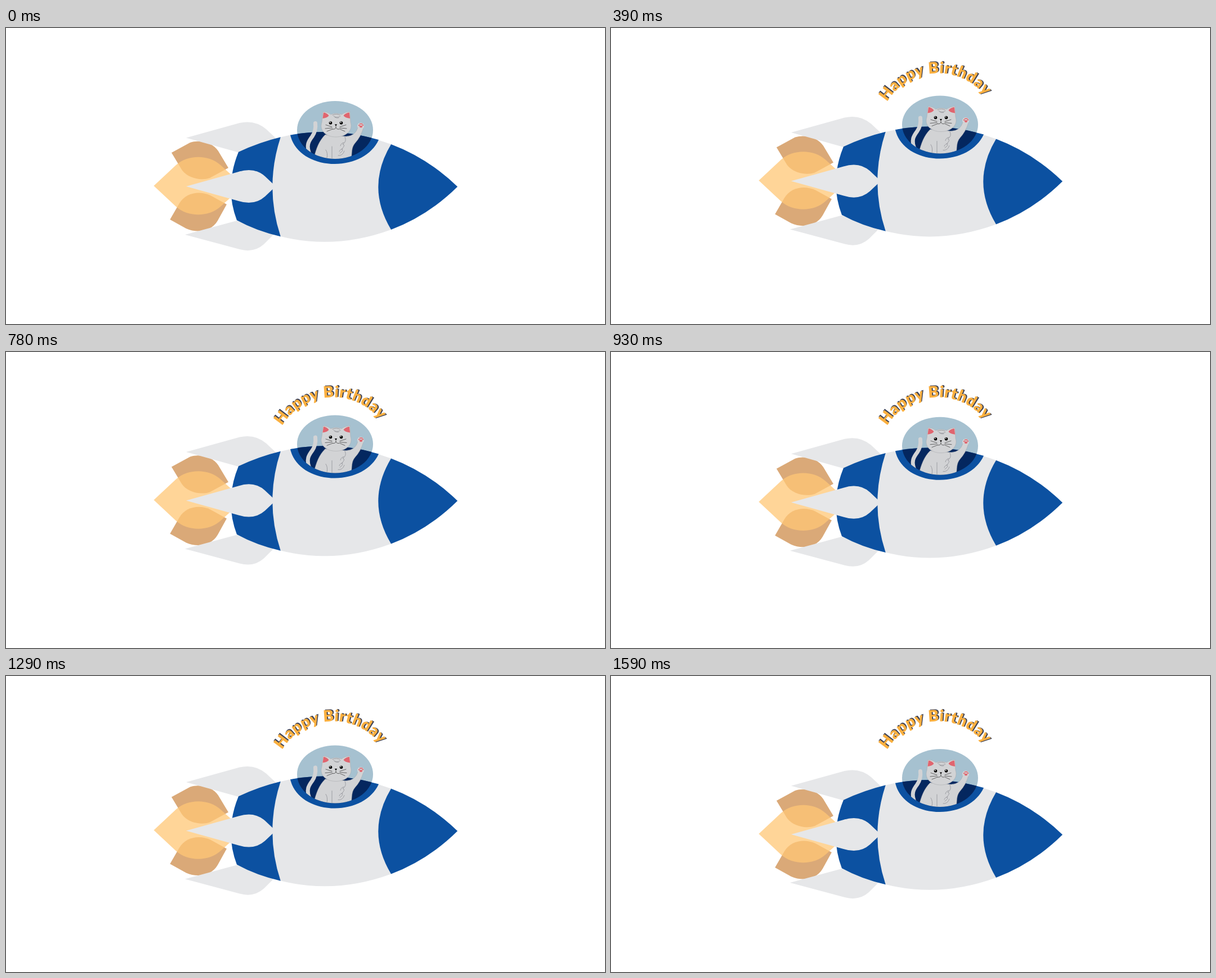
Recreate the animation shown at these times as an HTML page. Size 1064 by 527 pixels, loop 1.66 s.

```html
<!DOCTYPE html>
<html lang="en">
<head>
<meta charset="utf-8">
<title>Happy Birthday</title>
<style>
  html, body { margin: 0; height: 100%; overflow: hidden; background: #fff; }
  svg { display: block; width: 100vw; height: 100vh; }
  .blue { fill: #0c51a1; }
  .grey { fill: #e6e7e9; }
  .brown { fill: #daa978; }
  .fur { fill: #d2d3d5; }
  .edge { stroke: #a3a4a8; stroke-width: .5; }
  .pink { fill: #e0656f; }
  .line { fill: none; stroke: #333; stroke-width: .7; stroke-linecap: round; }
  .tuft { fill: none; stroke: #97989d; stroke-width: .9; stroke-linecap: round; }
  text { font: 900 28px Lato, "Open Sans", sans-serif; letter-spacing: .5px; }
</style>
</head>
<body>
<svg viewBox="0 0 1064 527">
  <defs>
    <path id="arc" d="M490.500 131.800A105.500 105.500 0 0 1 686.500 186"/>
    <ellipse id="dome" cx="584.5" cy="181.5" rx="67.5" ry="51.5"/>
    <path id="pit" d="M505 190.5Q585 176 662 199C650 226 618 242 584 242C545 242 512 222 505 190.5Z"/>
    <clipPath id="inDome"><use href="#dome"/></clipPath>
  </defs>

  <g id="ship">
    <!-- flames -->
    <path class="brown" d="M294 222L327 204C345 198 368 205 377 219L395 249L362 267C344 273 321 266 312 252Z"/>
    <path class="brown" d="M291.300 341L320 357C340 366 365 362 376 343L392 314L363 298C344 289 319 293 308 312Z"/>
    <path fill="#ffc776" fill-opacity=".75" d="M262.500 281L302 244C323 225 360 225 381 244L422 281L381 318C360 337 323 337 302 318Z"/>

    <!-- hull and fins -->
    <path class="grey" d="M320 195.5L415 169Q442 163 462 180L478 195L480 205L413 221.5Z"/>
    <path class="grey" d="M318 368L410 343L476 367L458 385Q440 401 415 394Z"/>
    <path class="grey" d="M487.5 194.5Q585 171 684 207Q639 283 684 359Q585 395.5 487.5 371Q458.5 283 487.5 194.5Z"/>
    <path class="blue" d="M413 220.700Q450 203.500 487.8 194.3Q458.8 283 487.8 371.3Q445 361.500 410 342.300Q387.500 283 413 220.700Z"/>
    <path class="blue" d="M684 207Q750 232 802 282.5Q750 334 684 359Q638.500 283 684 207Z"/>
    <path class="grey" d="M320 282L413 256Q441 247 460 264L479 282L460 300Q441 317 413 308Z"/>

    <!-- cockpit -->
    <use href="#dome" fill="#a6c1d0"/>
    <use href="#pit" class="blue"/>
    <use href="#pit" fill="#04275f" clip-path="url(#inDome)"/>

    <!-- cat -->
    <g clip-path="url(#inDome)">
      <path fill="none" stroke="#d2d3d5" stroke-width="7" stroke-linecap="round" d="M540 226C532 209 538 201 544 193Q551 183 549.500 169.500"/>
      <path class="fur edge" d="M567 190C556 201 551 214 546 235H613C615 222 613 213 620 205Q630 194 634.500 179L625 177Q621 192 604 193Z"/>
      <circle class="fur" cx="630" cy="174.500" r="6"/>
      <g class="pink">
        <ellipse cx="630.500" cy="175.500" rx="2.600" ry="2.100"/>
        <circle cx="627.200" cy="173.200" r="1.200"/>
        <circle cx="629.300" cy="170.800" r="1.200"/>
        <circle cx="632" cy="170.800" r="1.200"/>
        <circle cx="633.900" cy="173" r="1.200"/>
      </g>
      <path class="tuft" d="M570 232Q572 222 568 217M579 232V211M602 194Q606 202 598 207Q604 208 596 216Q601 217 593 223M600 204Q595 205 594 210M598 215Q593 216 592 220M590 227Q598 228 601 219"/>
      <path class="fur edge" d="M561 168L563 149Q571 149 577 154Q586 150 596 154Q603 149 611 149L612 168C617 183 603 194 586 194C569 194 556 183 561 168Z"/>
      <path class="pink" d="M562.500 161L564 150.500Q570 151 573.500 156Q571 160 562.500 161ZM611 161L610 150.500Q603 151 599.500 156Q602 160 611 161Z"/>
      <path class="tuft" d="M580 155Q587 152 593 155M582 157Q588 161 594 157M584 159Q588 161 591 160"/>
      <circle cx="576.500" cy="169" r="2.800"/>
      <circle cx="595.500" cy="169" r="2.800"/>
      <circle cx="575.800" cy="168" r=".9" fill="#fff"/>
      <circle cx="594.800" cy="168" r=".9" fill="#fff"/>
      <path d="M583.800 171.500H588.200L586 174.500Z"/>
      <path class="line" d="M586 174V177Q585 181 580 180M586 177Q587 181 592 180M579 176L568 172.500M579 178L567 179M580 180L570 184M593 176L604 172.500M593 178L605 179M593 180L602 184"/>
    </g>
  </g>

  <g id="wish">
    <text fill="#3d4257" dx="1.8" dy="-1"><textPath href="#arc">Happy Birthday</textPath></text>
    <text fill="#fbb040"><textPath href="#arc">Happy Birthday</textPath></text>
  </g>
</svg>
<script>
  const LOOP = 1660, STEP = 30, PEAK = 750, END = 1590, RISE = 18.2;
  const ship = document.getElementById('ship');
  const wish = document.getElementById('wish');
  const clamp = v => Math.max(0, Math.min(1, v));

  function draw(now) {
    const t = Math.min(END, Math.floor(now % LOOP / STEP) * STEP);
    const lift = RISE * Math.min(t / PEAK, (END - t) / (END - PEAK));
    ship.setAttribute('transform', `translate(0 ${-lift})`);
    wish.setAttribute('opacity', clamp((t - 150) / 210));
  }

  let start;
  function tick(now) {
    start ??= now;
    draw(now - start);
    requestAnimationFrame(tick);
  }
  draw(0);
  requestAnimationFrame(tick);
</script>
</body>
</html>
```
